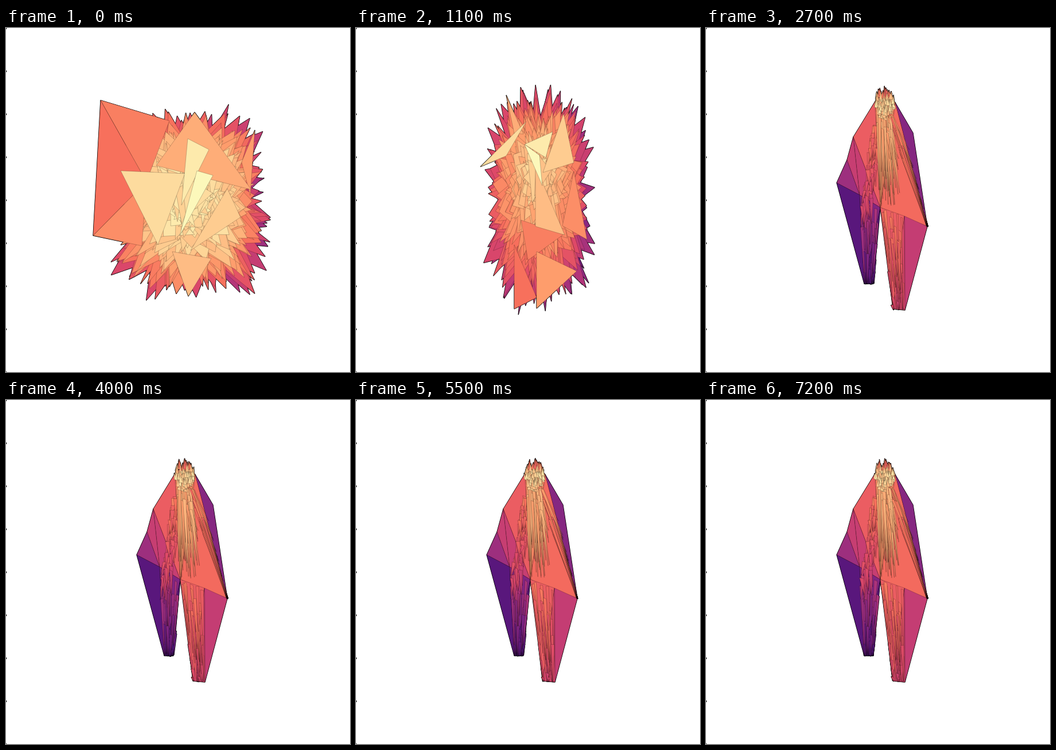
Write an HTML page with a canvas that moves like this. It is 600x600 px and loops after 7.8 s.

```html
<!DOCTYPE html>
<html lang="en">
<head>
<meta charset="utf-8">
<style>
  html, body { margin: 0; height: 100%; overflow: hidden; background: #fff; }
  canvas { display: block; }
</style>
</head>
<body>
<canvas id="stage" width="600" height="600"></canvas>
<script>
const ctx = document.getElementById('stage').getContext('2d');
const COUNT = 460, STEP = 100, LOOP = 7800, LAST = 72, SLIM = 11, SETTLED = 25;
const MAGMA = ['000004', '150e38', '3b0f70', '641a80', '8c2981', 'b73779',
  'de4968', 'f7705c', 'fe9f6d', 'fecf92', 'fcfdbf']
  .map(h => [0, 2, 4].map(k => parseInt(h.substr(k, 2), 16)));

const lerp = (a, b, p) => a + (b - a) * p;

function random(seed) {
  return () => {
    seed = seed + 0x6D2B79F5 | 0;
    let t = Math.imul(seed ^ seed >>> 15, 1 | seed);
    t = t + Math.imul(t ^ t >>> 7, 61 | t) ^ t;
    return ((t ^ t >>> 14) >>> 0) / 4294967296;
  };
}
const rnd = random(41);
const spread = size => size * (rnd() - .5);

function magma(tone) {
  const x = Math.max(0, Math.min(0.9999, tone)) * 10, k = Math.floor(x);
  return `rgb(${MAGMA[k].map((c, j) => Math.round(lerp(c, MAGMA[k + 1][j], x - k)))})`;
}

// A face is [x, y, x, y, x, y, tone, depth]. The largest facets run from back to front.
const byDepth = (corners, j, all) => [...corners, lerp(.7, .99, j / (all.length - 1)), 2 + j / 100];
const wideFacets = [
  [165, 126, 152, 362, 245, 268],
  [165, 126, 285, 162, 245, 268],
  [152, 362, 245, 268, 237, 380],
  [434, 178, 411, 234, 426, 292],
  [329, 147, 262, 240, 428, 282],
  [290, 390, 358, 402, 318, 468],
  [386, 280, 409, 330, 322, 388],
  [200, 249, 312, 254, 265, 378],
  [317, 193, 354, 212, 306, 309],
  [333, 249, 361, 257, 303, 362]
].map(byDepth);
const slimFacets = [
  [276, 378, 276, 490, 315, 470],
  [288, 335, 362, 360, 300, 405],
  [380, 250, 360, 345, 403, 369],
  [315, 390, 385, 424, 315, 489],
  [262, 117, 292, 185, 276, 184],
  [313, 240, 313, 346, 364, 361],
  [362, 149, 326, 252, 380, 235],
  [297, 163, 217, 242, 262, 223],
  [343, 181, 294, 203, 331, 226],
  [294, 203, 320, 222, 325, 275]
].map(byDepth);

// Joints of the standing figure: x, y and tone.
const joints = {
  crown: [312, 112, .5], neckL: [295, 128, .75], neckR: [330, 130, .9],
  arm: [257, 190, .6], cuff: [246, 230, .6], elbow: [228, 270, .3],
  waist: [268, 291, .42], crotch: [304, 313, .6], shoulder: [361, 183, -.3],
  hip: [386, 346, .55], knee: [346, 328, .65],
  heelL: [276, 446, .1], toeL: [292, 446, .1], heelR: [326, 490, .7], toeR: [347, 492, .4]
};
const panels = [
  'elbow waist heelL', 'waist crotch heelL', 'crotch toeL heelL', 'elbow cuff waist',
  'cuff arm waist', 'arm crotch waist', 'neckL arm crotch', 'neckR shoulder hip',
  'neckR hip crotch', 'neckL neckR crotch', 'knee hip toeR', 'crotch knee heelR',
  'knee toeR heelR', 'neckL crown neckR'
].map((names, j) => {
  const corners = names.split(' ').map(name => joints[name]);
  const tone = corners.reduce((sum, c) => sum + c[2], 0) / 3;
  return [...corners.flatMap(c => c.slice(0, 2)), tone, j / 100 - 1];
});

// Rounded boxes of spikes: radii, squareness, and how the light falls off.
const wide = { x: 322, y: 305, rx: 132, ry: 158, square: 6, lift: 8, fall: .22, bend: 2.5, dim: 0 };
const slim = { x: 319, y: 298, rx: 89, ry: 182, square: 4, lift: 45, fall: .25, bend: 1.2, dim: .1 };

function spike(i, ball) {
  const u = Math.sqrt(1 - .97 * i / COUNT), a = i * 2.39996 + .3 * rnd();
  const c = Math.cos(a), s = Math.sin(a), n = ball.square;
  const box = (Math.abs(c) ** n + Math.abs(s) ** n) ** (-1 / n);
  const tip = u * box * (.96 + .18 * rnd() ** 2), base = u * .6 - .3 * rnd();
  const w = .1 + .22 * rnd(), y0 = ball.y - ball.lift * (1 - u);
  const at = (r, side) => [ball.x + ball.rx * (r * c - side * s), y0 + ball.ry * (r * s + side * c)];
  const rim = u ** 9 * (.12 + .18 * Math.max(0, c));
  const tone = .94 - ball.fall * u ** ball.bend - rim - ball.dim * Math.max(0, s * u) + spread(.07);
  return [...at(tip, spread(.12)), ...at(base, w), ...at(base, -w), tone, i / COUNT];
}

function sliver(x0, y0, x1, y1, w, tone, z) {
  return [x0 - w, y0, x0 + w, y0 + 3 * rnd(), x1, y1, tone + spread(.08), z];
}

// Thin strands of the standing figure, by region.
function strand(i) {
  const s = rnd(), k = rnd(), m = Math.min(1, k + .15 + .5 * rnd()), z = i / COUNT / 10;
  const leg = (x0, dx0, y0, dy0, x1, dx1, y1, toneTop, toneEnd, depth) => {
    const x = p => lerp(x0 + dx0 * s, x1 + dx1 * s, p), y = p => lerp(y0 + dy0 * s, y1, p);
    return sliver(x(k), y(k), x(m), y(m), 2, lerp(toneTop, toneEnd, k), depth + z);
  };
  switch (i % 7) {
    case 0: return leg(269, 33, 285, 25, 276, 16, 446, .52, .24, 0);
    case 1: return leg(306, 38, 315, 13, 326, 20, 491, .69, .57, .2);
    case 2: { // left side
      const x = lerp(292, 270, k) + 16 * s, y = 165 + 145 * k;
      return sliver(x, y, x - 8 + 12 * rnd(), y + 15 + 30 * rnd(), 3, lerp(.71, .56, k), .4 + z);
    }
    case 3: // down the middle
      return sliver(300 + 24 * s, 140 + 60 * k, 301 + 36 * s, 220 + 95 * rnd(), 2.2, .82, .6 + z);
    case 4: // fanning to the right edge
      return sliver(lerp(318, 345, k * m) + 7 * s, lerp(150, 235, k * m),
        lerp(346, 386, m), lerp(180, 346, m), 2, lerp(.82, .68, m), .6 + z);
    default: { // head
      const a = 2 * Math.PI * s, r = Math.sqrt(k), up = Math.sin(a) * r;
      const x = 311.5 + 16 * Math.cos(a) * r, y = 133 + 23 * up;
      return [x - 2.5, y + 4, x + 2.5, y + 5, x + spread(4), y - 6 - 4 * rnd(),
        (up < -.6 ? .7 : .9) + spread(.1), 1 + z];
    }
  }
}

const faces = Array.from({ length: COUNT }, (_, i) =>
  ({ loose: 1, poses: [spike(i, wide), spike(i, slim), strand(i)] }));
panels.forEach((panel, j) => faces.push({
  loose: 0,
  poses: [wideFacets[j] || spike(20 * j, wide), slimFacets[j] || spike(20 * j, slim), panel]
}));

function tri(f) {
  ctx.beginPath();
  ctx.moveTo(f[0], f[1]);
  ctx.lineTo(f[2], f[3]);
  ctx.lineTo(f[4], f[5]);
  ctx.closePath();
}

function draw(step) {
  const early = step < SLIM, from = early ? 0 : 1;
  const p = early ? step / SLIM : Math.min(1, (step - SLIM) / (SETTLED - SLIM));
  const eased = early ? 1 - (1 - p) ** 2 : p ** 3;
  const sway = (early ? 16 : 9) * Math.sin(Math.PI * p);
  const noise = random(step * 977 + 5);
  const shapes = faces.map(({ poses, loose }) => {
    const shake = sway + (p === 1 ? 1.2 * loose : 0);
    return poses[from].map((v, k) =>
      lerp(v, poses[from + 1][k], eased) + (k < 6 ? shake * (2 * noise() - 1) : 0));
  }).sort((a, b) => a[7] - b[7]);

  ctx.fillStyle = '#fff';
  ctx.fillRect(0, 0, 600, 600);
  ctx.fillStyle = ctx.strokeStyle = '#000';
  for (let y = 0; y <= 600; y += 75) ctx.fillRect(0, y - 1, 1, 3);

  // Black strokes underneath leave an outline around the whole body.
  ctx.lineJoin = 'bevel';
  ctx.lineWidth = 1.3;
  for (const f of shapes) { tri(f); ctx.stroke(); }
  ctx.strokeStyle = 'rgba(0,0,0,.42)';
  ctx.lineWidth = .5;
  for (const f of shapes) {
    tri(f);
    ctx.fillStyle = magma(f[6]);
    ctx.fill();
    ctx.stroke();
  }
}

const start = performance.now();
let shown = -1;
function tick() {
  const step = Math.min(LAST, Math.floor((performance.now() - start) % LOOP / STEP));
  if (step !== shown) draw(shown = step);
  requestAnimationFrame(tick);
}
tick();
</script>
</body>
</html>
```
